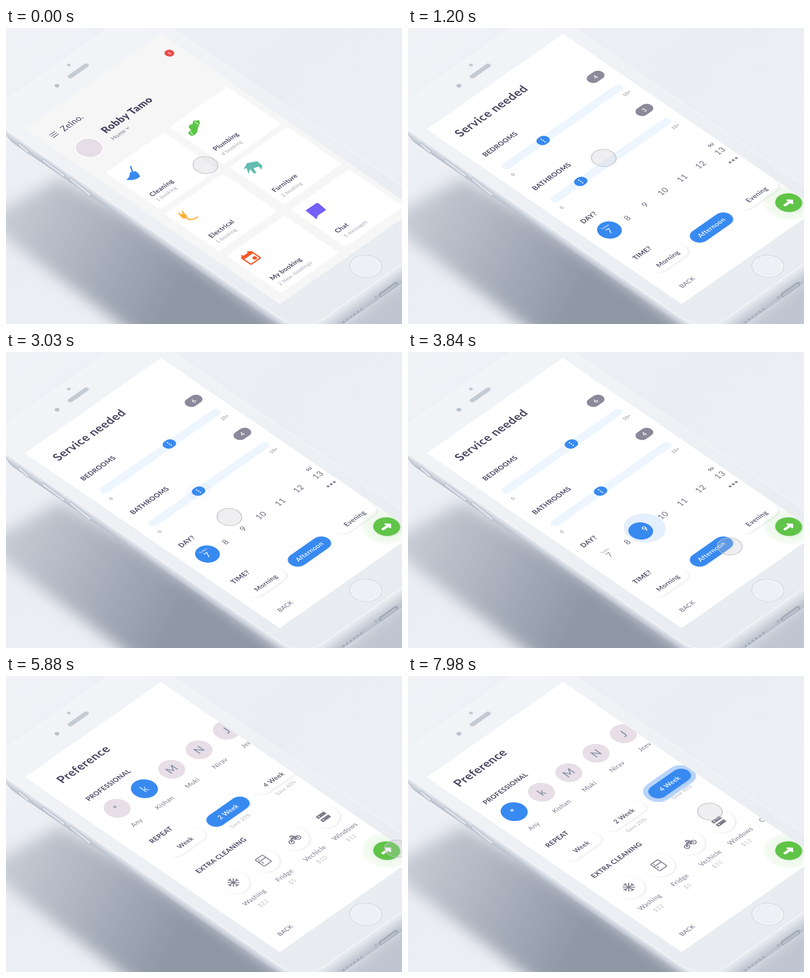
An HTML page for the animation above (8000 ms loop, 800 by 600 pixels).

```html
<!DOCTYPE html>
<html lang="en">
<head>
<meta charset="utf-8">
<title>Home service booking</title>
<style>
  html, body { margin: 0; width: 100%; height: 100%; overflow: hidden; background: #edf0f5; }
  svg { display: block; width: 100vw; height: 100vh; }
  text { font-family: Lato, "Open Sans", sans-serif; letter-spacing: .035em; text-anchor: middle; }
  .raised { filter: drop-shadow(1px 2px 2px rgba(90, 95, 125, .15)); }
  .line { fill: none; stroke-linecap: round; stroke-linejoin: round; }
</style>
</head>
<body>
<svg id="stage" viewBox="0 0 800 600"></svg>
<script>
const LOOP = 8000;
const BLUE = [56, 138, 240], WHITE = [255, 255, 255], INK = [80, 77, 100];
const GREY = [125, 122, 140], PINK = [231, 222, 231], LETTER = [138, 150, 168];
const DARK = '#4a4762', SOFT = '#7d7a8c', PALE = '#b5b3c0';

// Screen axes: u runs along the text, v runs down the phone.
const U = [.7333, -.5147], V = [.772, .532];
const matrix = (x, y) => `matrix(${U} ${V} ${x} ${y})`;
const at = (x, y, body, attrs = '') => `<g transform="${matrix(x, y)}" ${attrs}>${body}</g>`;
const group = (id, body) => `<g id="${id}">${body}</g>`;

const clamp = x => Math.max(0, Math.min(1, x));
const span = (t, start, dur) => clamp((t - start) / dur);
const out = p => 1 - (1 - p) ** 3;
const inOut = p => p * p * (3 - 2 * p);
const lerp = (a, b, p) => a + (b - a) * p;
const mix = (a, b, p) => `rgb(${a.map((c, i) => Math.round(lerp(c, b[i], p)))})`;

const label = (s, size, fill, weight = 400, id = '') =>
  `<text id="${id}" y="${size * .36}" font-size="${size}" font-weight="${weight}" fill="${fill}">${s}</text>`;
const text = (x, y, s, size, fill, weight, id) => at(x, y, label(s, size, fill, weight, id));
const heading = (x, y, s) => text(x, y, s, 15, DARK, 700);
const circle = (r, attrs) => `<circle r="${r}" ${attrs}/>`;
const box = (w, h, r, attrs) =>
  `<rect x="${-w / 2}" y="${-h / 2}" width="${w}" height="${h}" rx="${r}" ${attrs}/>`;
const halo = id => `<rect id="${id}Halo" fill="#388af0" opacity="0"/>`;
const pill = (id, x, y, w, s) => at(x, y,
  halo(id) + box(w, 36, 18, `id="${id}" class="raised"`) + label(s, 14.5, DARK, 600, id + 'Text'));

function phone() {
  let body = '';
  for (let i = 16; i > 0; i--) {
    body += at(38 + i, 205 + i * 1.75,
      `<rect x="-27" y="-80" width="429" height="832" rx="58" fill="${mix([238, 241, 245], [184, 191, 203], i / 16)}"/>`);
  }
  body += at(38, 205, `<rect x="-27" y="-80" width="429" height="832" rx="58" fill="url(#face)" stroke="#f5f7fa" stroke-width="1.5"/>`);
  for (const [x1, y1, x2, y2] of [[27, 236, 44, 251], [76, 269, 116, 299], [131, 307, 169, 338]]) {
    const d = `M${x1} ${y1}L${x2} ${y2}`;
    body += `<path class="line" d="${d}" stroke="#a9b1be" stroke-width="7"/><path class="line" d="${d}" stroke="#dce1e8" stroke-width="5"/>`;
  }
  for (let i = 0; i < 6; i++) body += `<circle cx="${682 + i * 7.2}" cy="${596 - i * 5.2}" r="2.3" fill="#a3abb9"/>`;
  body += `<path class="line" d="M757 541L788 519" stroke="#a3abb9" stroke-width="9"/>
    <path class="line" d="M759 541L787 521" stroke="#bac1cc" stroke-width="4"/>
    <circle cx="748" cy="546" r="2.8" fill="#bac1cc" stroke="#a0a8b6"/>`;
  body += at(146, 87, box(54, 10, 5, 'fill="#c4cad3" stroke="#dfe3e9"'));
  body += at(127, 75, circle(3.8, 'fill="#c6ccd5"')) + at(103, 117, circle(4.8, 'fill="#bcc3cd"'));
  body += at(727, 483, circle(30, 'fill="#edf0f4" stroke="#d3d8df" stroke-width="2"') + circle(28.5, 'fill="none" stroke="#fff" stroke-width="1.2"'));
  return body;
}

const homeIcons = {
  broom: `<path class="line" d="M252 281L256 293" stroke="#388af0" stroke-width="3"/>
    <path d="M250 293L261 290L267 294L271 301Q262 310 243 308Q251 302 250 293" fill="#388af0"/>`,
  pipe: `<path d="M378 188L390 187L392 192L389 199L386 211Q383 217 375 219L368 214Q369 208 374 207L369 201Q370 194 377 195Z" fill="#5cc646"/>
    <path class="line" d="M381 190L388 195M372 209L377 216" stroke="#fff" stroke-width="1.2"/>`,
  table: `<path d="M480 286L487 274L507 270L518 279L516 287L511 281L500 284L506 294L501 295L493 286L490 296L486 284Z" fill="#62bdb0"/>`,
  plug: `<path d="M351 380L359 374L366 381L364 386L357 386Z" fill="#fbb13c"/>
    <path class="line" d="M353 379L349 376M359 375L356 372M364 384Q373 393 387 383" stroke="#fbb13c" stroke-width="2.6"/>`,
  calendar: at(495, 466, `${box(26, 25, 2, 'fill="none" stroke="#f4592b" stroke-width="3"')}
    <path d="M-14 -13H14V-6H-14ZM-10 -17H-6V-12H-10ZM6 -17H10V-12H6Z" fill="#f4592b"/><circle cx="5" cy="5" r="4.5" fill="#f4592b"/>`),
  chat: `<path d="M605 370L627 355Q629 354 631 355L645 367Q647 369 645 370L630 380L627 388L623 384Z" fill="#7560f8"/>`
};

function home() {
  const cards = [
    [202, 293, 'broom', 'Cleaning', 314, 324, '1 booking', 324, 336],
    [330, 201, 'pipe', 'Plumbing', 444, 230, '4 booking', 456, 243],
    [321, 377, 'plug', 'Electrical', 435, 407, '1 booking', 445, 421],
    [452, 282, 'table', 'Furniture', 563, 314, '2 booking', 577, 327],
    [446, 462, 'calendar', 'My booking', 565, 488, '2 New. bookings', 584, 497],
    [576, 368, 'chat', 'Chat', 678, 405, '5 messages', 706, 407]
  ];
  return at(38, 205, '<rect width="375" height="667" fill="#f6f6f6"/>')
    + at(330, 51, circle(9.3, 'fill="#ee4b48"') + label('1', 9, '#fff', 700))
    + at(97, 216, `<path class="line" d="M-7 -5H7M-7 0H7M-7 5H7" stroke="#6a6780" stroke-width="1.6"/>`)
    + text(133, 192, 'Zelno.', 19, DARK)
    + at(168, 243, circle(26.5, 'fill="#e6dee7" stroke="#fff" stroke-width="2"'))
    + text(244, 176, 'Robby Tamo', 22.5, DARK, 900)
    + text(227, 216, 'Home', 13, SOFT)
    + at(245, 203, '<path class="line" d="M-3 -1L0 2L3 -1" stroke="#7d7a8c" stroke-width="1.4"/>')
    + cards.map(([x, y, icon, name, nx, ny, note, sx, sy]) =>
      at(x, y, '<rect width="159" height="142" rx="4" fill="#fff"/>') + homeIcons[icon]
      + text(nx, ny, name, 14.5, DARK, 700) + text(sx, sy, note, 11.3, '#a3a1b0')).join('');
}

function slider(id, name, nx, ny, x, y, value) {
  return heading(nx, ny, name)
    + `<g transform="${matrix(x, y)}"><path class="line" d="M0 0H307" stroke="#edf6fe" stroke-width="18"/></g>`
    + text(x + 13, y + 17, '0', 10, SOFT) + text(x + 243, y - 147.5, '10+', 10, SOFT)
    + at(x + 180, y - 181, box(38, 24, 12, 'fill="#8c899a"') + label(value, 13.5, '#fff', 600, id + 'Value'))
    + group(id + 'Target', halo(id))
    + group(id, box(27, 22, 11, 'fill="#388af0"')
      + [-5, 0, 5].map(v => `<circle cy="${v}" r="1.5" fill="#fff"/>`).join(''));
}

function days() {
  const spots = [[407, 411], [443, 385], [479, 358], [515, 331], [554, 304], [591, 277], [630, 249]];
  return heading(365, 384, 'DAY?') + at(478, 357, halo('day'))
    + group('day', circle(23.5, 'fill="#388af0"'))
    + text(398, 403, 'Today', 7, SOFT, 400, 'today')
    + spots.map(([x, y], i) => text(x, y, i + 7, 18, SOFT, 500, 'num' + (i + 7))).join('')
    + text(612, 237, 'SU', 9, DARK, 700)
    + at(657, 268, [-8.5, 0, 8.5].map(u => `<circle cx="${u}" r="2.8" fill="#8c899a"/>`).join(''));
}

function service() {
  return group('title', text(168, 168, 'Service needed', 26, DARK, 700))
    + group('beds', slider('bed', 'BEDROOMS', 186, 235.5, 199, 280, 4))
    + group('baths', slider('bath', 'BATHROOMS', 290, 301, 297.5, 347, 3))
    + group('dayRow', days())
    + group('timeRow', heading(473, 456, 'TIME?') + pill('morning', 525, 468, 95, 'Morning')
      + pill('noon', 613, 404.5, 103, 'Afternoon') + pill('evening', 704.5, 337.5, 103, 'Evening'));
}

function foot() {
  return text(564, 515.5, 'BACK', 13.5, '#6b6880')
    + at(769, 354, circle(48, 'id="glow" fill="url(#green)"')
      + circle(25.5, 'fill="#5fc447" class="raised"')
      + '<path class="line" d="M-10 0H7" stroke="#fff" stroke-width="6"/><path class="line" d="M3 -7L10 0L3 7Z" fill="#fff" stroke="#fff" stroke-width="3"/>');
}

function extraIcons() {
  let flake = '';
  for (let i = 0; i < 8; i++) {
    flake += `<path d="M0 0V-11${i % 2 ? '' : 'M-3 -11L0 -8L3 -11'}" transform="rotate(${i * 45})"/>`;
  }
  return [
    flake,
    box(20, 24, 2, '') + '<path d="M-10 -3H10M-5 -8V-6.5M-5 1V5"/>',
    '<circle cx="-9" cy="4" r="5"/><circle cx="9" cy="4" r="5"/><path d="M-9 4L-2 -3H6L9 4M-2 -3L2 4L6 -3L3 -8H-1" stroke-width="3"/>',
    '<path d="M-11 -10H11V-2H-11ZM-11 2H11V10H-11Z" fill="#7f7c8e" stroke="none"/><path d="M-6 -6H-5.9M-6 6H-5.9" stroke="#fff" stroke-width="3"/>',
    ''
  ];
}

function preference() {
  const people = [['*', 'Any'], ['k', 'Kishan'], ['M', 'Muki'], ['N', 'Nirav'], ['J', 'Jeev']];
  const extras = [['Washing', '$22'], ['Fridge', '$5'], ['Vechicle', '$10'], ['Windows', '$12'], ['Curtains', '']];
  const icons = extraIcons();
  return group('prefTitle', text(146, 186, 'Preference', 26, DARK, 700))
    + group('people', heading(196.5, 228, 'PROFESSIONAL') + people.map(([c, name], i) =>
      at(214.5 + i * 55.2, 275 - i * 39.5, (i ? '' : halo('who0'))
        + circle(25.7, `id="who${i}" fill="${mix(PINK, PINK, 0)}"`) + label(c, 24, mix(LETTER, LETTER, 0), 600, `who${i}Text`))
      + text(254 + i * 56, 304 - i * 40.2, name, 14.5, SOFT)).join(''))
    + group('repeat', heading(301, 330.5, 'REPEAT')
      + pill('week1', 350, 346, 95, 'Week') + pill('week2', 436.5, 283.5, 103, '2 Week') + pill('week4', 528.5, 218, 101, '4 Week')
      + text(461, 302, 'Save 20%', 11.5, PALE) + text(553, 235, 'Save 40%', 11.5, PALE))
    + group('extra', heading(421, 373, 'EXTRA CLEANING') + extras.map(([name, price], i) =>
      at(446 + i * 60.6, 428 - i * 44.4, circle(31, 'fill="#fff" class="raised"')
        + `<g class="line" stroke="#7f7c8e" stroke-width="2.1">${icons[i]}</g>`)
      + text(488 + i * 61, 458 - i * 44.6, name, 14.5, SOFT)
      + text(506 + i * 59.3, 470 - i * 44.2, price, 13, '#c5c3ce')).join(''));
}

const stage = document.getElementById('stage');
stage.innerHTML = `<defs>
  <linearGradient id="sky" x2="1" y2="1"><stop stop-color="#f0f2f6"/><stop offset=".4" stop-color="#eaedf2"/><stop offset="1" stop-color="#eef1f5"/></linearGradient>
  <linearGradient id="shade" gradientUnits="userSpaceOnUse" x1="0" y1="370" x2="350" y2="540"><stop stop-color="#c6ccd5"/><stop offset="1" stop-color="#8f97a6"/></linearGradient>
  <linearGradient id="face" x2="0" y2="1"><stop stop-color="#f2f4f7"/><stop offset="1" stop-color="#e8ebf0"/></linearGradient>
  <radialGradient id="green"><stop offset=".5" stop-color="#5fc447" stop-opacity=".12"/><stop offset=".8" stop-color="#5fc447" stop-opacity=".08"/><stop offset="1" stop-color="#5fc447" stop-opacity=".05"/></radialGradient>
  <filter id="blur" x="-20%" y="-20%" width="140%" height="140%"><feGaussianBlur stdDeviation="15"/></filter>
  <clipPath id="screen"><rect width="375" height="667" transform="${matrix(38, 205)}"/></clipPath>
</defs>
<rect width="800" height="600" fill="url(#sky)"/>
<path d="M-40 385L110 305L260 390L640 660L310 660L0 425Z" fill="url(#shade)" filter="url(#blur)"/>
<path d="M600 660L860 460V660Z" fill="#bfc6d1" filter="url(#blur)"/>
${phone()}
<g clip-path="url(#screen)">
  ${group('home', home())}
  ${group('panel', at(38, 205, '<rect width="375" height="667" fill="#fff"/>'))}
  ${group('service', service())}
  ${group('pref', preference())}
  ${group('foot', foot())}
</g>
${group('cursor', circle(23.5, 'fill="#c4c4ca" fill-opacity=".27" stroke="#bfbfc4" stroke-opacity=".75" stroke-width="2"'))}`;

const el = {};
stage.querySelectorAll('[id]').forEach(n => { if (n.id) el[n.id] = n; });
const set = (id, attrs) => { for (const k in attrs) el[id].setAttribute(k, attrs[k]); };
const slide = (id, u, v) => set(id, { transform: `translate(${u * U[0] + v * V[0]} ${u * U[1] + v * V[1]})` });
const place = (id, x, y) => set(id, { transform: matrix(x, y) });

// Tap times
const TAP = { bed: 1769, bath: 2500, day: 3528, evening: 4270, next: 5430, any: 7050, week4: 7660 };

const route = [
  [0, 403, 278], [250, 403, 278], [750, 428, 302], [950, 428, 302], [1600, 330, 186], [1780, 330, 186],
  [2100, 398, 273], [2300, 389, 282], [2560, 389, 282], [3300, 478, 357], [3560, 478, 357],
  [3840, 650, 394], [4130, 704, 337], [4350, 704, 337], [4950, 790, 350], [6000, 790, 350],
  [6850, 214, 275], [7100, 214, 275], [7500, 528, 218], [7680, 528, 218], [7980, 610, 275], [8000, 611, 276]
];

function moveCursor(t) {
  const i = route.findIndex(k => k[0] > t);
  const a = route[i - 1], b = route[i], p = inOut(span(t, a[0], b[0] - a[0]));
  place('cursor', lerp(a[1], b[1], p), lerp(a[2], b[2], p));
}

function ripple(id, t, start, w, h, grow, strength) {
  const p = span(t, start, 600), g = grow * out(p);
  set(id + 'Halo', {
    x: -w / 2 - g, y: -h / 2 - g, width: w + 2 * g, height: h + 2 * g, rx: h / 2 + g,
    opacity: p > 0 ? strength * (1 - p) : 0
  });
}

function paint(id, p, off, on, inkOff, inkOn) {
  set(id, { fill: mix(off, on, p) });
  set(id + 'Text', { fill: mix(inkOff, inkOn, p) });
}
const paintPill = (id, p) => paint(id, p, WHITE, BLUE, INK, WHITE);
const paintWho = (id, p, ink) => paint(id, p, PINK, BLUE, LETTER, ink);

function knob(id, t, from, to) {
  const p = out(span(t, TAP[id], 600));
  place(id, lerp(from[0], to[0], p), lerp(from[1], to[1], p));
  place(id + 'Target', ...to);
  ripple(id, t, TAP[id], 27, 22, 11, .3);
}

function draw(t) {
  const rise = (id, start, dur = 700) => slide(id, 0, 667 * (1 - out(span(t, start, dur))));
  rise('panel', 247);
  rise('title', 200, 540);
  set('title', { opacity: span(t, 580, 120) });
  rise('beds', 324);
  rise('baths', 335);
  rise('dayRow', 339);
  rise('timeRow', 345);
  rise('foot', 345);
  set('glow', { r: 48 + 1.5 * Math.sin(t / 1000 * Math.PI) });

  knob('bed', t, [273, 228], [330, 186.5]);
  knob('bath', t, [349, 311], [389, 282]);
  el.bedValue.textContent = t < TAP.bed + 180 ? 4 : 6;
  el.bathValue.textContent = t < TAP.bath + 180 ? 3 : 4;

  const d = out(span(t, TAP.day, 600));
  place('day', lerp(407, 478, d), lerp(409.5, 357, d));
  ripple('day', t, TAP.day, 47, 47, 18.5, .28);
  set('num7', { fill: mix(WHITE, GREY, d) });
  set('today', { fill: mix(WHITE, GREY, d) });
  set('num9', { fill: mix(GREY, WHITE, d), 'font-weight': d > .5 ? 700 : 500 });

  const e = span(t, TAP.evening, 250);
  paintPill('morning', 0);
  paintPill('noon', 1 - e);
  paintPill('evening', e);
  ripple('evening', t, TAP.evening, 103, 36, 11, .77);

  const enter = (id, start) => slide(id, 375 * (1 - out(span(t, start, 650))), 0);
  slide('service', -400 * out(span(t, TAP.next, 650)), 0);
  set('pref', { visibility: t < TAP.next ? 'hidden' : 'visible' });
  enter('prefTitle', 5447);
  enter('people', 5446);
  enter('repeat', 5460);
  enter('extra', 5468);

  const a = span(t, TAP.any, 250);
  paintWho('who0', a, WHITE);
  paintWho('who1', 1 - a, [183, 215, 251]);
  ripple('who0', t, TAP.any, 51, 51, 18.5, .28);

  const w = span(t, TAP.week4, 250);
  paintPill('week1', 0);
  paintPill('week2', 1 - w);
  paintPill('week4', w);
  ripple('week4', t, TAP.week4, 101, 36, 11, .77);

  moveCursor(t);
}

function frame() {
  draw(performance.now() % LOOP);
  requestAnimationFrame(frame);
}
frame();
</script>
</body>
</html>
```
